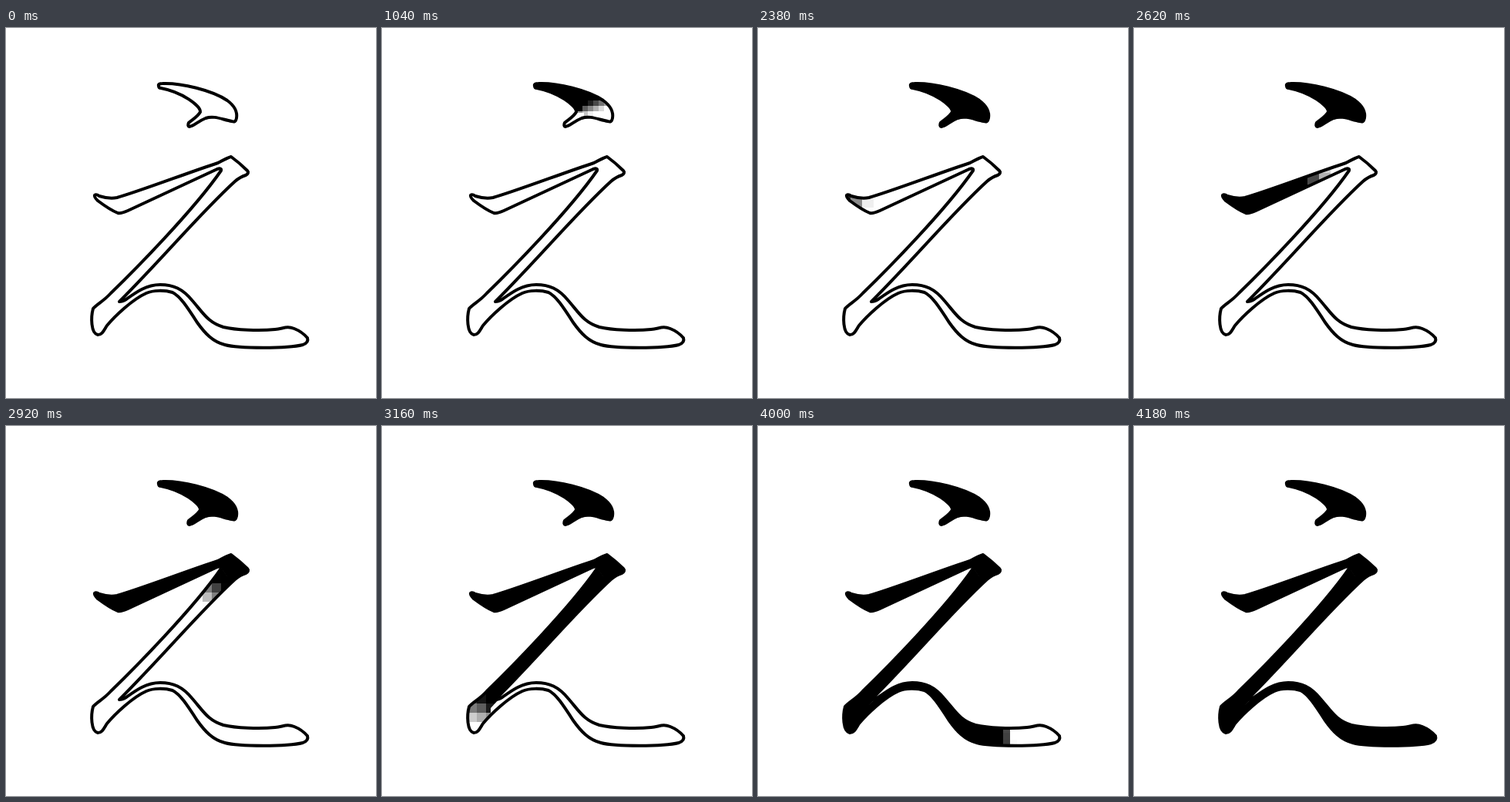
An HTML page with a canvas for the animation above (4.78 s loop, 480 by 480 pixels).

```html
<!DOCTYPE html>
<html lang="ja">
<head>
<meta charset="utf-8">
<title>Stroke order</title>
<style>
html, body { margin: 0; width: 100%; height: 100%; overflow: hidden; background: #fff; }
canvas { display: block; width: 480px; height: 480px; }
</style>
</head>
<body>
<canvas width="480" height="480"></canvas>
<script>
const ctx = document.querySelector('canvas').getContext('2d');
const LOOP = 4780, TICK = 60;

const glyph = new Path2D(`
  M198 75 Q197 72 203 72 C227 71 268 81 287 94 C298 102 300 111 299 117
  Q298 123 293 121 C281 119 270 113 259 117 C249 121 244 127 238 128
  Q235 127 237 123 C241 119 248 116 252 109 C253 101 228 83 201 78 Q198 78 198 75 Z
  M115 217 Q117 215 121 218 Q134 222 144 220 C170 213 238 187 275 175
  Q288 168 292 167 Q303 175 313 185 Q316 188 311 191 Q304 193 297 199
  C252 240 205 297 147 355 Q151 355 156 352 C167 344 181 333 200 333
  C217 333 229 338 242 354 C256 370 262 382 282 388 C298 392 330 393 349 391
  C360 390 364 386 374 390 Q384 394 391 402 Q393 408 385 411
  C365 416 302 416 284 411 C268 407 258 396 248 382 C235 362 226 348 216 343
  C206 340 191 340 182 344 C164 352 141 374 131 386 C127 392 125 398 119 398
  C110 396 110 375 113 364 C118 358 126 355 136 344
  C166 315 243 237 279 185 Q280 181 274 183 L158 237 Q149 241 145 240
  Q135 236 119 224 Q114 219 115 217 Z`);

// keys: [tick, length of path covered]; grid: [x, y, cell size]
const strokes = [
  { start: 800, soft: 16, grid: [190, 66, 7],
    area: [190, 60, 310, 60, 310, 130, 262, 130, 262, 110, 190, 110],
    path: [200, 75, 235, 83, 272, 90, 285, 122],
    keys: [[0, 0], [5, 94], [8, 126]] },
  { start: 1350, soft: 8, grid: [225, 101, 7],
    area: [225, 109, 263, 109, 263, 135, 225, 135],
    path: [258, 111, 238, 126],
    keys: [[0, 0], [6, 34]] },
  { start: 2380, soft: 35, grid: [105, 158, 15],
    area: [105, 158, 330, 158, 330, 196, 287, 196, 279, 184, 150, 255, 105, 255],
    path: [115, 218, 145, 231, 200, 212, 300, 178],
    keys: [[0, 0], [5, 152], [9, 233]] },
  { start: 2920, soft: 35, grid: [99, 180, 12],
    area: [330, 195, 287, 195, 279, 183, 150, 255, 100, 340, 100, 405, 141, 405, 141, 366, 152, 354],
    path: [290, 190, 213, 270, 128, 362, 117, 392],
    keys: [[0, 0], [5, 262], [9, 305]] },
  { start: 3460, soft: 12, grid: [138, 308, 9],
    area: [140, 425, 140, 366, 152, 354, 200, 310, 400, 310, 400, 425],
    path: [140, 366, 165, 350, 185, 339, 200, 337, 215, 339, 235, 357, 258, 390, 280, 399, 320, 404, 388, 402],
    keys: [[0, 0], [5, 82], [9, 202], [13, 296]] }
];

const clamp = v => Math.max(0, Math.min(1, v));

// Distance along the path of the point nearest to (x, y)
function along(path, x, y) {
  let best = Infinity, found = 0, travelled = 0;
  for (let i = 0; i + 3 < path.length; i += 2) {
    const [ax, ay, bx, by] = path.slice(i, i + 4);
    const dx = bx - ax, dy = by - ay, len = Math.hypot(dx, dy);
    const u = clamp(((x - ax) * dx + (y - ay) * dy) / (len * len));
    const gap = Math.hypot(x - ax - u * dx, y - ay - u * dy);
    if (gap < best) { best = gap; found = travelled + u * len; }
    travelled += len;
  }
  return found;
}

function valueAt(keys, tick) {
  const i = keys.findIndex(key => key[0] >= tick);
  if (i < 0) return keys[keys.length - 1][1];
  if (i === 0) return keys[0][1];
  const [t0, v0] = keys[i - 1], [t1, v1] = keys[i];
  return v0 + (v1 - v0) * (tick - t0) / (t1 - t0);
}

for (const s of strokes) {
  s.region = new Path2D();
  for (let i = 0; i < s.area.length; i += 2) s.region.lineTo(s.area[i], s.area[i + 1]);
  const [x0, y0, size] = s.grid;
  const right = Math.max(...s.area.filter((_, i) => i % 2 === 0));
  const bottom = Math.max(...s.area.filter((_, i) => i % 2));
  s.cells = [];
  for (let y = y0; y < bottom; y += size)
    for (let x = x0; x < right; x += size)
      s.cells.push([x, y, along(s.path, x + size / 2, y + size / 2)]);
}

function reveal(s, t) {
  const tick = Math.floor((t - s.start) / TICK) + 1;
  if (tick < 1) return;
  const front = valueAt(s.keys, tick), size = s.grid[2];
  const done = tick >= s.keys[s.keys.length - 1][0];
  ctx.save();
  ctx.clip(s.region);
  if (done) ctx.fill(glyph);
  else {
    ctx.clip(glyph);
    for (const [x, y, d] of s.cells) {
      ctx.globalAlpha = clamp((front - d) / s.soft);
      ctx.fillRect(x, y, size, size);
    }
  }
  ctx.restore();
}

function draw(now) {
  const t = now % LOOP;
  ctx.fillStyle = '#fff';
  ctx.fillRect(0, 0, 480, 480);
  ctx.fillStyle = ctx.strokeStyle = '#000';
  ctx.lineWidth = 4;
  ctx.lineJoin = 'round';
  for (const s of strokes) reveal(s, t);
  ctx.stroke(glyph);
}

const began = performance.now();
function loop() {
  draw(performance.now() - began);
  requestAnimationFrame(loop);
}
loop();
</script>
</body>
</html>
```
